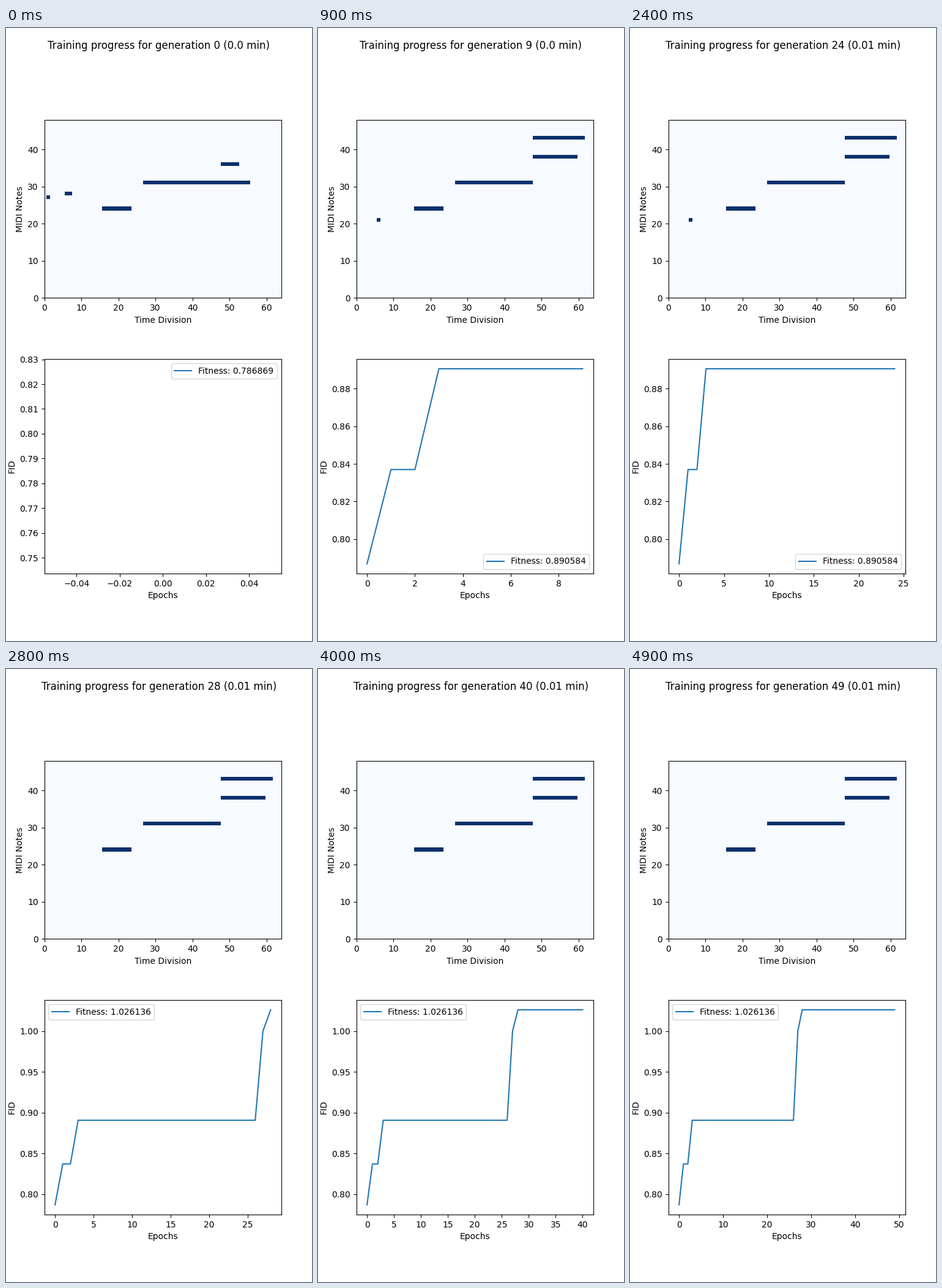
Recreate the animation shown at these times as a matplotlib script. Size 500 by 1000 pixels, loop 5.1 s.

```python
import numpy as np
import matplotlib.pyplot as plt
from matplotlib.animation import FuncAnimation

PITCHES, STEPS = 48, 64
GENERATIONS = 50
HOLD = 1  # extra frames on the last generation
SECONDS_PER_GEN = 0.014


def best_fitness():
    """Fitness stays level and climbs only when a mutation pays off."""
    gain = np.zeros(GENERATIONS)
    gain[0] = 0.786869
    gain[1] = 0.837 - 0.786869
    gain[3] = 0.890584 - 0.837
    gain[27] = 1 - 0.890584
    gain[28] = 0.026136
    return gain.cumsum()


def piano_roll(gen):
    """Notes of the fittest melody: stray ones vanish, high ones settle in."""
    roll = np.zeros((PITCHES, STEPS))

    def note(pitch, start, stop):
        roll[pitch, start:stop] = 1

    note(24, 16, 24)
    note(31, 27, 48 if gen else 56)
    if gen == 0:
        note(27, 1, 2)
        note(36, 48, 53)
    else:
        note(38, 48, 60)
    if gen < 3:
        note(28, 6, 8)
    else:
        note(43, 48, 62)
        if gen < 27:
            note(21, 6, 7)
    return roll


fitness = best_fitness()

fig, (roll_ax, fit_ax) = plt.subplots(2, 1, figsize=(5, 10), dpi=100)
title = fig.suptitle("")
image = roll_ax.imshow(piano_roll(0), cmap="Blues", vmin=0, vmax=1,
                       origin="lower")
roll_ax.set(xlim=(0, STEPS), ylim=(0, PITCHES),
            xlabel="Time Division", ylabel="MIDI Notes")


def draw(frame):
    gen = min(frame, GENERATIONS - 1)
    minutes = round(gen * SECONDS_PER_GEN / 60, 2)
    title.set_text(f"Training progress for generation {gen} ({minutes} min)")
    image.set_data(piano_roll(gen))

    fit_ax.clear()
    fit_ax.plot(fitness[:gen + 1], label=f"Fitness: {fitness[gen]:.6f}")
    fit_ax.set(xlabel="Epochs", ylabel="FID")
    fit_ax.legend(loc="best")
    return []


anim = FuncAnimation(fig, draw, frames=GENERATIONS + HOLD, interval=100,
                     repeat=True, repeat_delay=0, init_func=lambda: draw(0))

plt.show()
```
